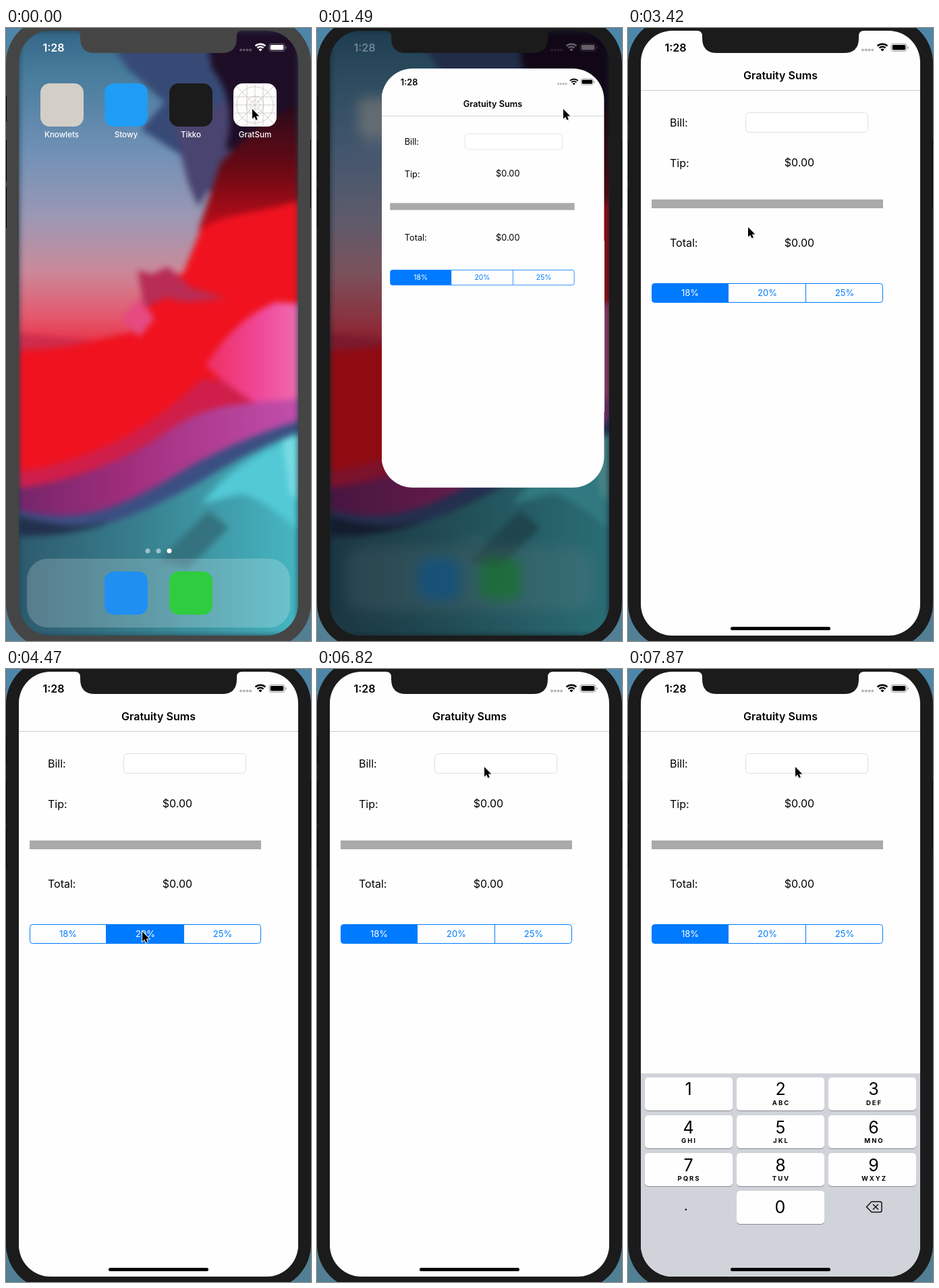
An HTML page without scripts that plays this animation: 452 px wide and 908 px high, repeating every 8 s.

```html
<!DOCTYPE html>
<html lang="en">
<head>
<meta charset="utf-8">
<title>Phone demo</title>
<style>
  html, body { margin: 0; width: 100%; height: 100%; overflow: hidden; }
  body {
    position: relative;
    background: linear-gradient(#4d86a8, #527f94);
    font-family: Inter, "Open Sans", sans-serif;
    --blue: #007aff; --tint: #d8e8fc; --paper: #fefefe;
  }
  svg { position: absolute; left: 0; top: 0; display: block; }
  text { font-family: Inter, "Open Sans", sans-serif; }
  .mid { text-anchor: middle; }

  .bezel, .bezel-dim, .press, .home, .shade, .old-status, .app,
  .s1, .s2, .s3, .caret, .keys, .cursor {
    animation: 8s step-end infinite;
  }

  .bezel { animation-name: bezel; }
  @keyframes bezel { 0% { fill: #454545 } 14.6%, 100% { fill: #1b1b1b } }

  .screen {
    position: absolute; left: 19px; top: 4px; width: 414px; height: 896px;
    border-radius: 47px; overflow: hidden; background: #204050;
  }
  .wall { filter: blur(5px); }

  .press { animation-name: press; }
  @keyframes press { 0% { filter: none } 14.6%, 100% { filter: brightness(.6) } }

  .home { animation-name: home; transform-origin: 207px 448px; }
  @keyframes home {
    0% { transform: none; filter: none; opacity: 1 }
    18.6%, 100% { transform: scale(.945); filter: blur(9px); opacity: .6 }
  }
  .shade { animation-name: shade; }
  @keyframes shade { 0% { opacity: 0 } 18.6%, 100% { opacity: .4 } }
  .old-status { color: #fff; animation-name: fade; }
  @keyframes fade { 0% { opacity: 1 } 18.6%, 100% { opacity: .35 } }

  .app {
    position: absolute; inset: 0; background: var(--paper); color: #000;
    transform-origin: 0 0; animation-name: launch;
  }
  @keyframes launch {
    0% { visibility: hidden; transform: none; clip-path: none }
    18.6% { visibility: visible; transform: translate(76.5px, 56px) scale(.797); clip-path: inset(0 0 117px round 58px) }
    20.45% { visibility: visible; transform: translate(15.5px, 10.6px) scale(.956); clip-path: inset(0 0 11px round 50px) }
    22.35% { visibility: visible; transform: translate(3px, 2px) scale(.9903); clip-path: inset(0 0 1px round 47px) }
    24.2%, 100% { visibility: visible; transform: none; clip-path: none }
  }

  .label { font-size: 16px; }
  .seg { font-size: 13px; text-anchor: middle; }
  .seg text { fill: currentColor; }
  .s1 { animation-name: s1; }
  .s2 { animation-name: s2; }
  .s3 { animation-name: s3; }
  @keyframes s1 {
    0%, 76% { fill: var(--blue); color: #fff }
    55.85% { fill: var(--paper); color: var(--blue) }
    74.1% { fill: var(--tint); color: var(--blue) }
    75.95%, 100% { fill: var(--blue); color: #fff }
  }
  @keyframes s2 {
    0%, 63.2%, 75.95%, 100% { fill: var(--paper); color: var(--blue) }
    53.95%, 66.85% { fill: var(--tint); color: var(--blue) }
    55.85%, 68.6% { fill: var(--blue); color: #fff }
  }
  @keyframes s3 {
    0%, 68.6%, 100% { fill: var(--paper); color: var(--blue) }
    61.35% { fill: var(--tint); color: var(--blue) }
    63.2% { fill: var(--blue); color: #fff }
  }

  .caret { animation-name: caret; }
  @keyframes caret { 0%, 98.35%, 100% { opacity: 0 } 90.85% { opacity: 1 } }

  .keys { animation-name: slide; }
  @keyframes slide {
    0% { transform: translateY(310px) }
    90.85% { transform: translateY(230px) }
    92.7% { transform: translateY(40px) }
    94.6%, 100% { transform: none }
  }
  .digit { font-size: 25px; text-anchor: middle; }
  .abc { font-size: 9.5px; font-weight: 700; letter-spacing: 2px; text-anchor: middle; }

  .cursor { animation-name: move; }
  @keyframes move {
    0% { transform: translate(365px, 120px) }
    26.1% { transform: translate(358px, 122px) }
    27.85% { transform: translate(335px, 129px) }
    29.7% { transform: translate(306px, 135px) }
    31.6% { transform: translate(289px, 138px) }
    33.35% { transform: translate(288.5px, 138.5px) }
    37.1% { transform: translate(228px, 212px) }
    38.95% { transform: translate(172px, 281px) }
    42.7% { transform: translate(178px, 295px) }
    44.6% { transform: translate(184px, 322px) }
    46.45% { transform: translate(192px, 357px) }
    48.35% { transform: translate(199px, 381px) }
    50.2% { transform: translate(202px, 389px) }
    57.7% { transform: translate(240px, 391px) }
    59.45% { transform: translate(295px, 392px) }
    61.35% { transform: translate(318px, 392px) }
    65.1% { transform: translate(265px, 393px) }
    66.85% { transform: translate(218px, 393px) }
    70.45% { transform: translate(165px, 392px) }
    72.35% { transform: translate(110px, 390px) }
    77.85% { transform: translate(135px, 350px) }
    79.7% { transform: translate(200px, 250px) }
    81.6% { transform: translate(248px, 163px) }
    83.45% { transform: translate(248px, 150px) }
    85.2%, 100% { transform: translate(248px, 145px) }
  }
</style>
</head>
<body>

<svg width="452" height="908">
  <defs>
    <g id="status" fill="currentColor">
      <text class="mid" x="70.5" y="35" font-size="16" font-weight="600">1:28</text>
      <g opacity=".28">
        <circle cx="348" cy="32.5" r="2"/><circle cx="352.8" cy="32.5" r="2"/>
        <circle cx="357.5" cy="32.5" r="2"/><circle cx="362.2" cy="32.5" r="2"/>
      </g>
      <g fill="none" stroke="currentColor" stroke-width="2.5">
        <path d="M369.6 26.6a10.7 10.7 0 0 1 14.8 0M372.5 29.6a6.6 6.6 0 0 1 9 0"/>
      </g>
      <path d="M377 34.6l-2.6-2.7a3.7 3.7 0 0 1 5.2 0z"/>
      <rect x="390" y="23.3" width="23" height="11" rx="3.3" fill="none" stroke="currentColor" opacity=".4"/>
      <rect x="391.7" y="25" width="19.6" height="7.6" rx="1.8"/>
      <path d="M414.5 27v4q1.4-.6 1.4-2t-1.4-2z" opacity=".45"/>
    </g>
    <rect id="tile" width="64" height="64" rx="14"/>
    <g id="key">
      <rect y="1" width="130" height="49" rx="5" fill="#898b8f"/>
      <rect width="130" height="49" rx="5" fill="#fefefe"/>
    </g>
    <g id="row">
      <use href="#key" x="25"/><use href="#key" x="161"/><use href="#key" x="297"/>
    </g>
  </defs>
  <rect class="bezel" x="0" y="-15" width="452" height="934" rx="67"/>
  <path d="M.5 101v38M.5 166v62M.5 235v61M451.5 165v102" stroke="#000"/>
</svg>

<div class="screen">
  <svg class="wall" width="414" height="896" viewBox="19 4 414 896">
    <defs>
      <linearGradient id="sky" x2="0" y2="1">
        <stop stop-color="#2a5a7c"/><stop offset=".1" stop-color="#477c9b"/>
        <stop offset=".22" stop-color="#7090b6"/><stop offset=".32" stop-color="#9b98b4"/>
        <stop offset=".4" stop-color="#c98a9a"/><stop offset=".47" stop-color="#e4596e"/>
        <stop offset=".54" stop-color="#ec1c30"/>
      </linearGradient>
      <linearGradient id="maroon" x2="0" y2="1">
        <stop stop-color="#1f0a1c"/><stop offset=".55" stop-color="#6a0913"/><stop offset="1" stop-color="#c00c1a"/>
      </linearGradient>
      <linearGradient id="pink">
        <stop stop-color="#ee2e5e"/><stop offset=".5" stop-color="#f0489a"/><stop offset="1" stop-color="#ee7dbb"/>
      </linearGradient>
      <linearGradient id="plum">
        <stop stop-color="#6d2468"/><stop offset=".4" stop-color="#a02d7c"/><stop offset="1" stop-color="#c452b0"/>
      </linearGradient>
      <linearGradient id="teal">
        <stop stop-color="#2b5468"/><stop offset=".45" stop-color="#38808f"/><stop offset="1" stop-color="#48bdc8"/>
      </linearGradient>
    </defs>
    <rect x="-20" y="-30" width="500" height="970" fill="url(#sky)"/>
    <path d="M120-30H460V260L290 240 262 190 200 150 235 110 180 60z" fill="#374a76"/>
    <path d="M245 130L330 110 330 190 285 265 270 230z" fill="#4a4470"/>
    <path d="M290-30H460V170L325 180Q345 110 305 60z" fill="#1e0d26"/>
    <path d="M318 200Q380 130 460 100V290L285 300z" fill="url(#maroon)"/>
    <path d="M460 245C400 275 320 270 288 300L262 365 235 362 205 405 190 450C130 462 100 475-10 478V740L460 620z" fill="#f0121f"/>
    <path d="M195 358L215 365 240 354 275 385 328 400 270 406 235 400 205 415z" fill="#b82c55"/>
    <path d="M198 400L220 430 198 458 170 432z" fill="#e54a80"/>
    <path d="M-10 450L130 462Q80 478-10 478z" fill="#cf2b4c"/>
    <path d="M-10 660C120 650 220 590 290 520L460 530V620L-10 740z" fill="#d01e4a"/>
    <path d="M295 500Q340 430 400 406L460 410V590Q370 570 295 500z" fill="url(#pink)"/>
    <path d="M-10 685C100 675 180 640 250 590C320 545 380 560 460 545V620C300 640 200 740 100 740L-10 715z" fill="url(#plum)"/>
    <path d="M-10 705C120 755 200 690 290 640C350 610 400 590 460 575V940H-10z" fill="#3b4f82"/>
    <path d="M-10 715C60 735 110 745 150 730L100 790H-10z" fill="#22304c"/>
    <path d="M-10 750C120 765 220 710 300 665C350 635 400 610 460 590V940H-10z" fill="url(#teal)"/>
    <path d="M290 705C330 650 390 620 460 595V770Q390 700 350 690z" fill="#52c9d5"/>
    <path d="M410 610L460 595V720L420 690z" fill="#78dce4"/>
    <path d="M225 790L300 715 330 740 270 800z" fill="#34727f"/>
  </svg>

  <svg class="home" width="414" height="896" viewBox="19 4 414 896">
    <use href="#tile" x="51" y="82" fill="#d3cfc8"/>
    <use href="#tile" x="146" y="82" fill="#1f9cf5"/>
    <use href="#tile" x="242" y="82" fill="#1b1b1b"/>
    <g class="press">
      <use href="#tile" x="337" y="82" fill="#fdfdfd"/>
      <g fill="none" stroke="#c3beb4" stroke-width=".7">
        <path d="M338 114h62M369 83v62M341 86l56 56M397 86l-56 56M357 83v62M381 83v62M338 102h62M338 126h62"/>
        <circle cx="369" cy="114" r="7"/><circle cx="369" cy="114" r="13"/><circle cx="369" cy="114" r="27"/>
      </g>
    </g>
    <g class="mid" fill="#fff" font-size="11.6" font-weight="500">
      <text x="82.5" y="162">Knowlets</text>
      <text x="178" y="162">Stowy</text>
      <text x="274" y="162">Tikko</text>
      <text x="369" y="162">GratSum</text>
    </g>
    <g fill="#fff">
      <circle cx="210" cy="774.5" r="3.5" opacity=".5"/>
      <circle cx="226" cy="774.5" r="3.5" opacity=".5"/>
      <circle cx="242" cy="774.5" r="3.5"/>
      <rect x="31" y="786" width="390" height="102" rx="31" opacity=".2"/>
    </g>
    <use href="#tile" x="146" y="805" fill="#1f8ff2"/>
    <use href="#tile" x="242" y="805" fill="#2ecc3e"/>
  </svg>

  <svg width="414" height="896" viewBox="19 4 414 896">
    <rect class="shade" x="19" y="4" width="414" height="896"/>
    <use class="old-status" href="#status"/>
  </svg>

  <div class="app">
    <svg width="414" height="896" viewBox="19 4 414 896">
      <use href="#status"/>
      <text class="mid" x="226" y="76" font-size="16" font-weight="600">Gratuity Sums</text>
      <path d="M19 92.5H433" stroke="#cdcdcd"/>
      <g class="label">
        <text x="62" y="146">Bill:</text>
        <text x="62" y="206">Tip:</text>
        <text x="62" y="323.5">Total:</text>
        <text class="mid" x="254" y="204.5">$0.00</text>
        <text class="mid" x="254" y="323.5">$0.00</text>
      </g>
      <rect x="174.5" y="125.5" width="181" height="29" rx="5" fill="#fff" stroke="#dfdfdf"/>
      <rect class="caret" x="181" y="130" width="2" height="20" rx="1" fill="#426bf2"/>
      <rect x="35" y="254" width="343" height="13" fill="#aaa"/>
      <g class="seg">
        <g class="s1"><path d="M149 378.5H39.5q-4 0-4 4v20q0 4 4 4H149z"/><text x="92" y="397.3">18%</text></g>
        <g class="s2"><path d="M149 378.5h114.5v28H149z"/><text x="206.5" y="397.3">20%</text></g>
        <g class="s3"><path d="M263.5 378.5h110q4 0 4 4v20q0 4-4 4h-110z"/><text x="321" y="397.3">25%</text></g>
      </g>
      <g fill="none" stroke="#007aff">
        <rect x="35.5" y="378.5" width="342" height="28" rx="4"/>
        <path d="M148.5 378.5v28M263.5 378.5v28"/>
      </g>

      <g class="keys">
        <rect x="19" y="599" width="414" height="301" fill="#d0d3d9"/>
        <use href="#row" y="605"/><use href="#row" y="661"/><use href="#row" y="717"/>
        <use href="#key" x="161" y="773"/>
        <g class="digit">
          <text x="89.5" y="631">1</text><text x="226" y="631">2</text><text x="364" y="631">3</text>
          <text x="89.5" y="688">4</text><text x="226" y="688">5</text><text x="364" y="688">6</text>
          <text x="89.5" y="744">7</text><text x="226" y="744">8</text><text x="364" y="744">9</text>
          <text x="86" y="802" font-size="20">.</text><text x="225.5" y="806">0</text>
        </g>
        <g class="abc">
          <text x="227" y="645.5">ABC</text><text x="365" y="645.5">DEF</text>
          <text x="90.5" y="702">GHI</text><text x="227" y="702">JKL</text><text x="365" y="702">MNO</text>
          <text x="90.5" y="758">PQRS</text><text x="227" y="758">TUV</text><text x="365" y="758">WXYZ</text>
        </g>
        <path d="M361 789h12.500q2.500 0 2.500 2.500v10.500q0 2.500-2.500 2.500H361l-7.500-7.700zM363.500 793.300l7 7m0-7l-7 7"
              fill="none" stroke="#111" stroke-width="1.5" stroke-linejoin="round" stroke-linecap="round"/>
      </g>
      <rect x="152" y="887" width="148" height="5" rx="2.5"/>
    </svg>
  </div>
</div>

<svg width="452" height="908">
  <path class="bezel" d="M102 3V4q8 0 8 8v3q0 22 22 22H320q22 0 22-22v-3q0-8 8-8V3z"/>
  <g class="cursor">
    <path d="M1 1.500v14.500l3.300-3 2 4.800 2.500-1-2-4.700h4.500z" fill="#000" opacity=".22"/>
    <path d="M0 0v14.500l3.300-3 2 4.800 2.500-1-2-4.700h4.500z" stroke="#fff" stroke-width="1.800" paint-order="stroke"/>
  </g>
</svg>

</body>
</html>
```
